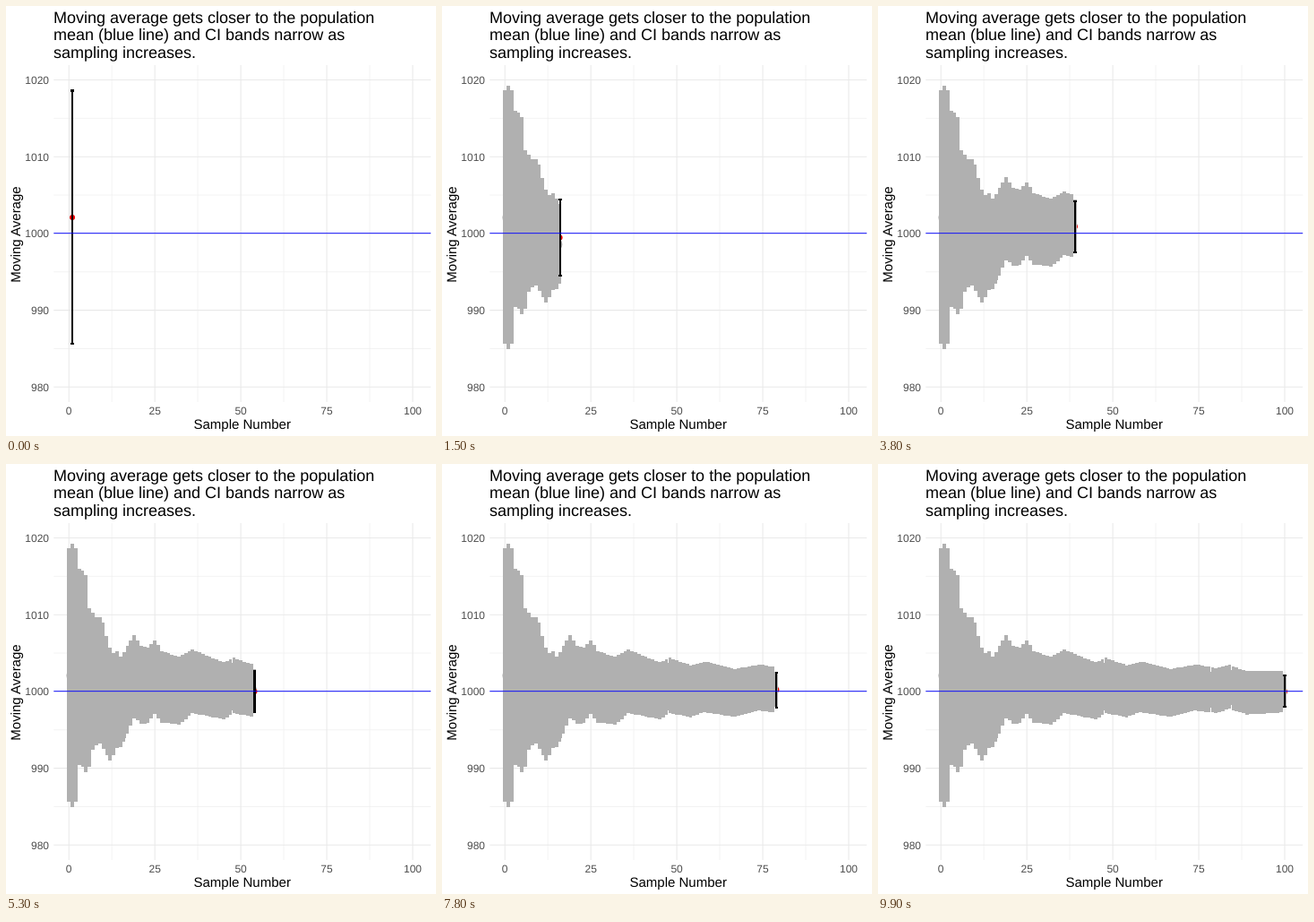
Animation of 480x480 px, one loop 10 s. Source, as an HTML page:

```html
<!DOCTYPE html>
<html lang="en">
<head>
<meta charset="utf-8">
<title>Moving average</title>
<style>
  html, body { margin: 0; width: 100%; height: 100%; overflow: hidden; background: #fff; }
  svg {
    display: block; width: 480px; height: 480px;
    font-family: "Liberation Sans", Arial, sans-serif;
    text-rendering: geometricPrecision;
  }
  .title { font-size: 18px; }
  .axis { font-size: 15px; text-anchor: middle; }
  .tick { font-size: 12px; fill: #4d4d4d; }
  .major { stroke: #e9e9e9; stroke-width: 1.07; }
  .minor { stroke: #ebebeb; stroke-width: .6; }
  .bars { shape-rendering: crispEdges; }
</style>
</head>
<body>
<svg viewBox="0 0 480 480">
  <g id="grid"></g>
  <path id="oldDots" fill="#b0b0b0"/>
  <circle id="dot" r="3" fill="#f00000"/>
  <path id="oldBars" class="bars" fill="#b0b0b0"/>
  <path id="bar" class="bars"/>
  <rect x="53.3" y="253.1" width="420.9" height="1.07" fill="#00f" fill-opacity=".85"/>
  <g class="title">
    <text x="53" y="19">Moving average gets closer to the population</text>
    <text x="53" y="38.4">mean (blue line) and CI bands narrow as</text>
    <text x="53" y="57.8">sampling increases.</text>
  </g>
  <text class="axis" x="263.7" y="472">Sample Number</text>
  <text class="axis" transform="translate(16 255) rotate(-90)">Moving Average</text>
</svg>
<script>
  const COUNT = 100, STEP = 100, MEAN = 1000;
  const $ = id => document.getElementById(id);
  const px = n => 70.2 + n * 3.838;
  const py = v => 253.9 - (v - MEAN) * 8.57;

  // Turning points of the running average: [sample, distance from the mean]
  const drift = [
    [1, 2.1], [2, 3.4], [4, 3], [5, .5], [6, 1.3], [9, 1.4], [12, -2.1],
    [14, -.9], [15, -1.4], [19, 2.1], [21, .8], [23, .8], [25, 1.9],
    [27, .6], [32, .1], [36, 1.3], [45, .1], [48, .8], [54, 0], [58, .6],
    [67, -.2], [74, .5], [80, .15], [84, .6], [89, -.2], [100, 0]
  ];
  // Width of the interval before it shrinks with the root of n
  const spread = [
    [1, 16.5], [2, 17.6], [4, 24.2], [7, 20.7], [9, 22.7], [16, 19.7],
    [32, 21.2], [54, 20], [100, 20.4]
  ];

  function along(points, n) {
    const i = Math.max(1, points.findIndex(p => p[0] >= n));
    const [x0, y0] = points[i - 1], [x1, y1] = points[i];
    return y0 + (y1 - y0) * (n - x0) / (x1 - x0);
  }

  const samples = Array.from({ length: COUNT }, (_, i) => {
    const n = i + 1;
    const avg = MEAN + along(drift, n);
    const half = along(spread, n) / Math.sqrt(n);
    return { x: px(n), mid: py(avg), top: py(avg + half), low: py(avg - half) };
  });

  const box = (x, y, hw, hh) =>
    `M${x - hw} ${y - hh}h${2 * hw}v${2 * hh}h${-2 * hw}z`;
  const errorBar = (s, half) =>
    box(s.x, s.mid, half, (s.low - s.top) / 2) +
    box(s.x, s.top, 1.9, half) + box(s.x, s.low, 1.9, half);
  const disc = (s, r) =>
    `M${s.x - r} ${s.mid}a${r} ${r} 0 1 1 ${2 * r} 0a${r} ${r} 0 1 1 ${-2 * r} 0z`;

  function drawGrid() {
    const line = (kind, d) => `<path class="${kind}" d="${d}"/>`;
    const col = n => `M${px(n)} 66V442`;
    const row = v => `M53.3 ${py(v)}H474.2`;
    let out = "";
    for (let n = 12.5; n < 100; n += 25) out += line("minor", col(n));
    for (let v = 985; v < 1020; v += 10) out += line("minor", row(v));
    for (let n = 0; n <= 100; n += 25)
      out += line("major", col(n)) +
        `<text class="tick" x="${px(n)}" y="456" text-anchor="middle">${n}</text>`;
    for (let v = 980; v <= 1020; v += 10)
      out += line("major", row(v)) +
        `<text class="tick" x="48" y="${py(v) + 4.5}" text-anchor="end">${v}</text>`;
    $("grid").innerHTML = out;
  }

  let shown = -1;
  function show(i) {
    if (i === shown) return;
    shown = i;
    const past = samples.slice(0, i), now = samples[i];
    $("oldDots").setAttribute("d", past.map(s => disc(s, 6.7)).join(""));
    $("oldBars").setAttribute("d", past.map(s => errorBar(s, 5.69)).join(""));
    $("bar").setAttribute("d", errorBar(now, 1.07));
    $("dot").setAttribute("cx", now.x);
    $("dot").setAttribute("cy", now.mid);
  }

  function tick() {
    show(Math.floor(performance.now() / STEP) % COUNT);
    requestAnimationFrame(tick);
  }

  drawGrid();
  tick();
</script>
</body>
</html>
```
